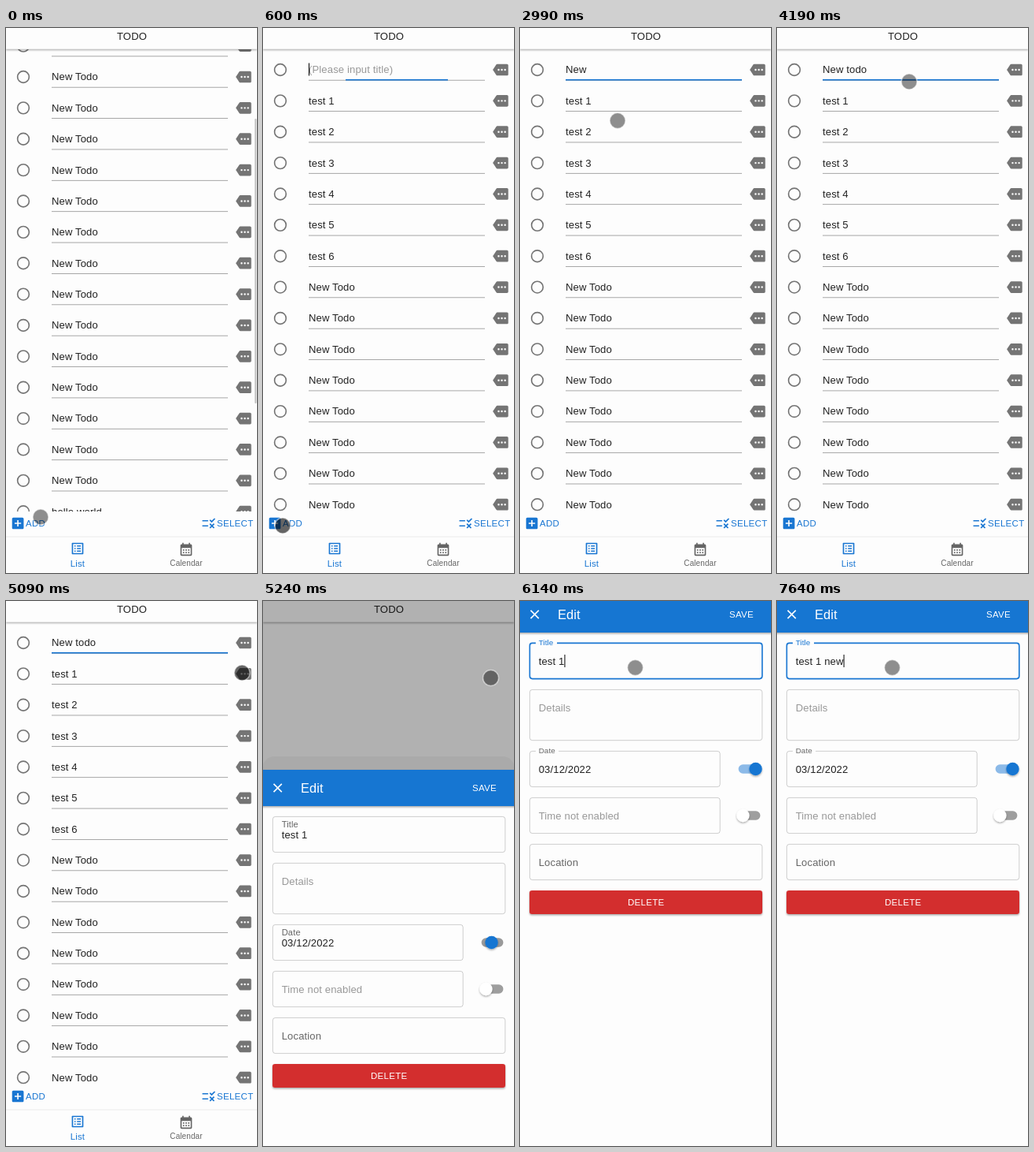
Animation of 319x691 px, one loop 8000 ms. Source, as an HTML page:

```html
<!DOCTYPE html>
<html lang="en">
<head>
<meta charset="utf-8">
<title>Todo app</title>
<style>
  html, body { margin: 0; width: 100%; height: 100%; overflow: hidden; background: #fdfdfd; }
  svg { display: block; width: 100%; height: 100%; }
  text { font: 13.09px "Liberation Sans", Arial, sans-serif; letter-spacing: .00938em; white-space: pre; fill: rgba(0,0,0,.87); }
  .btn { font-size: 11.45px; letter-spacing: .02857em; }
  .mid { text-anchor: middle; }
  .small { font-size: 9.82px; }
  .soft { fill: rgba(0,0,0,.4); }
  .label { fill: rgba(0,0,0,.6); }
  .icon { fill: rgba(0,0,0,.54); }
  .blue { fill: #1976d2; }
  .white { fill: #fff; }
  .box { fill: none; stroke: rgba(0,0,0,.23); stroke-width: .82; }
  .focus .box { stroke: #1976d2; stroke-width: 1.64; }
</style>
</head>
<body>
<svg id="stage" viewBox="0 0 319 691" preserveAspectRatio="none">
  <defs>
    <clipPath id="view"><rect y="27" width="319" height="586"/></clipPath>
    <filter id="drop" x="-20%" y="-30%" width="140%" height="180%">
      <feDropShadow dx="0" dy="1.4" stdDeviation="1.3" flood-opacity=".35"/>
    </filter>
  </defs>
</svg>
<script>
const PERIOD = 8000, PITCH = 39.37;
const stage = document.getElementById('stage');

const ICONS = {
  more: 'M22 3H7c-.69 0-1.23.35-1.59.88L0 12l5.41 8.11c.36.53.97.89 1.66.89H22c1.1 0 2-.9 2-2V5c0-1.1-.9-2-2-2zM9 13.5a1.5 1.5 0 1 1 0-3 1.5 1.5 0 0 1 0 3zm5 0a1.5 1.5 0 1 1 0-3 1.5 1.5 0 0 1 0 3zm5 0a1.5 1.5 0 1 1 0-3 1.5 1.5 0 0 1 0 3z',
  add: 'M19 3H5c-1.11 0-2 .9-2 2v14c0 1.1.89 2 2 2h14c1.1 0 2-.9 2-2V5c0-1.1-.9-2-2-2zm-2 10h-4v4h-2v-4H7v-2h4V7h2v4h4v2z',
  rule: 'M16.54 11 13 7.46l1.41-1.41 2.12 2.12 4.24-4.24 1.41 1.41zM11 7H2v2h9zM21 13.41 19.59 12 17 14.59 14.41 12 13 13.41 15.59 16 13 18.59 14.41 20 17 17.41 19.59 20 21 18.59 18.41 16zM11 15H2v2h9z',
  list: 'M19 5v14H5V5h14m1.1-2H3.9c-.5 0-.9.4-.9.9v16.2c0 .4.4.9.9.9h16.2c.4 0 .9-.5.9-.9V3.9c0-.5-.5-.9-.9-.9zM11 7h6v2h-6zM11 11h6v2h-6zM11 15h6v2h-6zM7 7h2v2H7zM7 11h2v2H7zM7 15h2v2H7z',
  month: 'M19 4h-1V2h-2v2H8V2H6v2H5c-1.11 0-2 .9-2 2v14c0 1.1.89 2 2 2h14c1.1 0 2-.9 2-2V6c0-1.1-.9-2-2-2zm0 16H5V10h14zM9 14H7v-2h2zM13 14h-2v-2h2zM17 14h-2v-2h2zM9 18H7v-2h2zM13 18h-2v-2h2zM17 18h-2v-2h2z',
  close: 'M19 6.41 17.59 5 12 10.59 6.41 5 5 6.41 10.59 12 5 17.59 6.41 19 12 13.41 17.59 19 19 17.59 13.41 12z'
};

function make(tag, attrs, parent) {
  const el = document.createElementNS('http://www.w3.org/2000/svg', tag);
  for (const k in attrs) el.setAttribute(k, attrs[k]);
  return parent.appendChild(el);
}
const group = (parent, attrs = {}) => make('g', attrs, parent);
const rect = (parent, x, y, width, height, attrs) => make('rect', { x, y, width, height, ...attrs }, parent);
const disc = (parent, cx, cy, r, attrs) => make('circle', { cx, cy, r, ...attrs }, parent);
function label(parent, x, y, str, cls = '') {
  const el = make('text', { x, y, class: cls }, parent);
  el.textContent = str;
  return el;
}
// 24-unit icon centred on (cx, cy)
const icon = (parent, name, cx, cy, cls = 'icon') => make('path', {
  d: ICONS[name], class: cls, transform: `translate(${cx - 9.82} ${cy - 9.82}) scale(.818)`
}, parent);

function row(parent, y, str) {
  disc(parent, 22, y, 7.36, { fill: 'none', stroke: 'rgba(0,0,0,.54)', 'stroke-width': 1.64 });
  rect(parent, 58, y + 12.8, 224, .82, { fill: 'rgba(0,0,0,.42)' });
  icon(parent, 'more', 301.9, y);
  return label(parent, 58, y + 4.4, str);
}

// List screen
rect(stage, 0, 0, 319, 691, { fill: '#fdfdfd' });
const list = group(stage);
const scrolled = group(list, { 'clip-path': 'url(#view)' });
for (let i = -1; i < 15; i++) row(scrolled, 62 + i * PITCH, i < 14 ? 'New Todo' : 'hello world');
rect(scrolled, 316, 115, 2.6, 361, { rx: 1.3, fill: '#c9c9c9' });

const top0 = group(list, { 'clip-path': 'url(#view)' });
const newText = row(top0, 53, '');
for (let i = 1; i < 15; i++) row(top0, 53 + i * PITCH, i < 7 ? 'test ' + i : 'New Todo');
const hint = label(top0, 58, 57.4, '(Please input title)', 'soft');
const accent = rect(top0, 58, 64.9, 224, 1.64, { class: 'blue' });
const newCaret = rect(top0, 58, 44.5, 1, 16, {});

icon(list, 'add', 15.1, 628, 'blue');
label(list, 25, 632.1, 'ADD', 'btn blue');
icon(list, 'rule', 257.7, 628, 'blue');
label(list, 268, 632.1, 'SELECT', 'btn blue');
rect(list, 0, 644.5, 319, 1, { fill: '#ececec' });
icon(list, 'list', 91, 660, 'blue');
label(list, 91, 683, 'List', 'btn blue mid').style.letterSpacing = '.12px';
icon(list, 'month', 229, 661, 'label');
const cal = label(list, 229, 682.4, 'Calendar', 'label mid');
cal.style.fontSize = '10px';

rect(stage, 0, -4, 319, 30.5, { fill: '#fdfdfd', filter: 'url(#drop)' });
label(stage, 160, 15.3, 'TODO', 'mid');

// Edit dialog
const shade = group(stage);
rect(shade, 0, 0, 319, 691, { fill: 'rgba(0,0,0,.3)' });
rect(shade, 0, 197, 319, 40, { rx: 14, fill: 'rgba(0,0,0,.04)' });

const dialog = group(stage);
rect(dialog, 0, -6, 319, 700, { fill: '#fdfdfd' });
rect(dialog, -10, -6, 339, 46, { class: 'blue', filter: 'url(#drop)' });
icon(dialog, 'close', 18.7, 17, 'white');
label(dialog, 48, 22.8, 'Edit', 'white').style.fontSize = '16.36px';
label(dialog, 266, 21.1, 'SAVE', 'btn white');

function field(y, w, h, str, cls) {
  const g = group(dialog);
  rect(g, 12.4, y, w, h, { rx: 3.3, class: 'box' });
  const text = label(g, 23.7, y + 27.5, str, cls);
  return { g, text };
}
// Field whose label floats up into a gap in the border
function floating(y, w, str, name, gap) {
  const f = field(y, w, 45.2, str, '');
  f.gap = rect(f.g, 20, y - 1.5, gap, 3, { fill: '#fdfdfd' });
  f.name = label(f.g, 23.7, y, name, 'label');
  f.float = up => {
    f.gap.style.display = up ? '' : 'none';
    f.name.setAttribute('y', y + (up ? 2.9 : 13.1));
    f.name.style.fontSize = up ? '9.82px' : '11.2px';
  };
  return f;
}
const title = floating(53.4, 295.4, 'test 1', 'Title', 27);
const editCaret = rect(title.g, 56, 68, 1, 16, {});
field(112.4, 295.4, 64.3, 'Details', 'soft');
const date = floating(190.4, 241.8, '03/12/2022', 'Date', 29);
field(249.4, 241.8, 45.2, 'Time not enabled', 'soft');
field(308.4, 295.4, 45.2, 'Location', 'label');

const track = y => rect(dialog, 277.6, y - 5.7, 27.8, 11.45, { rx: 5.7, fill: '#9e9e9e' });
const dateTrack = track(213);
const dateThumb = disc(dialog, 299.5, 213, 8.2, { class: 'blue', filter: 'url(#drop)' });
track(272);
disc(dialog, 283.4, 272, 8.2, { class: 'white', filter: 'url(#drop)' });
rect(dialog, 12, 367, 296, 30, { rx: 3.3, fill: '#d32f2f', filter: 'url(#drop)' });
label(dialog, 160.2, 386.1, 'DELETE', 'btn white mid');

const pointer = disc(stage, 0, 0, 10, { stroke: 'rgba(255,255,255,.5)', 'stroke-width': 1.5 });

// Steps: time, x, y, pressed
const PATH = [
  [0, 44, 620], [150, 36, 625], [300, 28, 630], [450, 25, 631], [600, 25, 631, 1],
  [750, 38, 560], [900, 84, 270], [1050, 114, 131], [1200, 119, 124], [1350, 124, 117.5],
  [4040, 135, 102], [4190, 168, 68], [4340, 214, 44], [4490, 260, 36], [4640, 288, 48],
  [4790, 298, 76], [4940, 300, 91], [5090, 300, 91, 1], [5240, 289.5, 97.5], [5390, 189.5, 130.5],
  [5540, 162, 106], [5690, 150, 91], [5840, 146.5, 84.5]
];
// Steps: time, text, caret shown
const TYPED = [
  [0, '', 0], [600, '', 1], [1050, '', 0], [1650, '', 1], [1800, 'N', 1], [2240, 'Ne', 1],
  [2390, 'New', 1], [2990, 'New', 0], [3290, 'New t', 1], [3440, 'New tod', 1],
  [3590, 'New todo', 1], [4190, 'New todo', 0]
];
const RENAMED = [
  [0, 'test 1', 0], [5990, 'test 1', 1], [6590, 'test 1', 0], [6740, 'test 1 ', 1],
  [7190, 'test 1 ', 0], [7340, 'test 1 n', 1], [7490, 'test 1 ne', 1], [7640, 'test 1 new', 1]
];

const at = (steps, t) => steps.findLast(s => s[0] <= t);
const show = (el, on) => { el.style.display = on ? '' : 'none'; };

function type(text, caret, x, [, str, on]) {
  text.textContent = str;
  show(caret, on);
  if (on) caret.setAttribute('x', x + (str ? text.getComputedTextLength() : 0));
}

function draw(t) {
  const added = t >= 600, open = t >= 5240, sliding = open && t < 5390;
  show(list, !open);
  show(scrolled, !added);
  show(top0, added);
  show(shade, sliding);
  show(dialog, open);

  if (!open) {
    const step = at(TYPED, t), grow = t < 750;
    type(newText, newCaret, 58, step);
    show(hint, !step[1]);
    accent.setAttribute('x', grow ? 105 : 58);
    accent.setAttribute('width', grow ? 130 : 224);
  } else {
    dialog.setAttribute('transform', `translate(0 ${sliding ? 220 : 0})`);
    title.float(!sliding);
    date.float(!sliding);
    dateThumb.setAttribute('cx', sliding ? 290.5 : 299.5);
    dateTrack.setAttribute('fill', sliding ? '#9a9a9a' : '#8cbae8');
    title.g.setAttribute('class', t >= 5990 ? 'focus' : '');
    title.name.setAttribute('class', t >= 6140 ? 'blue' : 'label');
    type(title.text, editCaret, 23.7, at(RENAMED, t));
  }

  const [, x, y, down] = at(PATH, t);
  pointer.setAttribute('cx', x);
  pointer.setAttribute('cy', y);
  pointer.setAttribute('fill', `rgba(0,0,0,${down ? .6 : .44})`);
}

const start = performance.now();
function tick() {
  draw((performance.now() - start) % PERIOD);
  requestAnimationFrame(tick);
}
tick();
</script>
</body>
</html>
```
